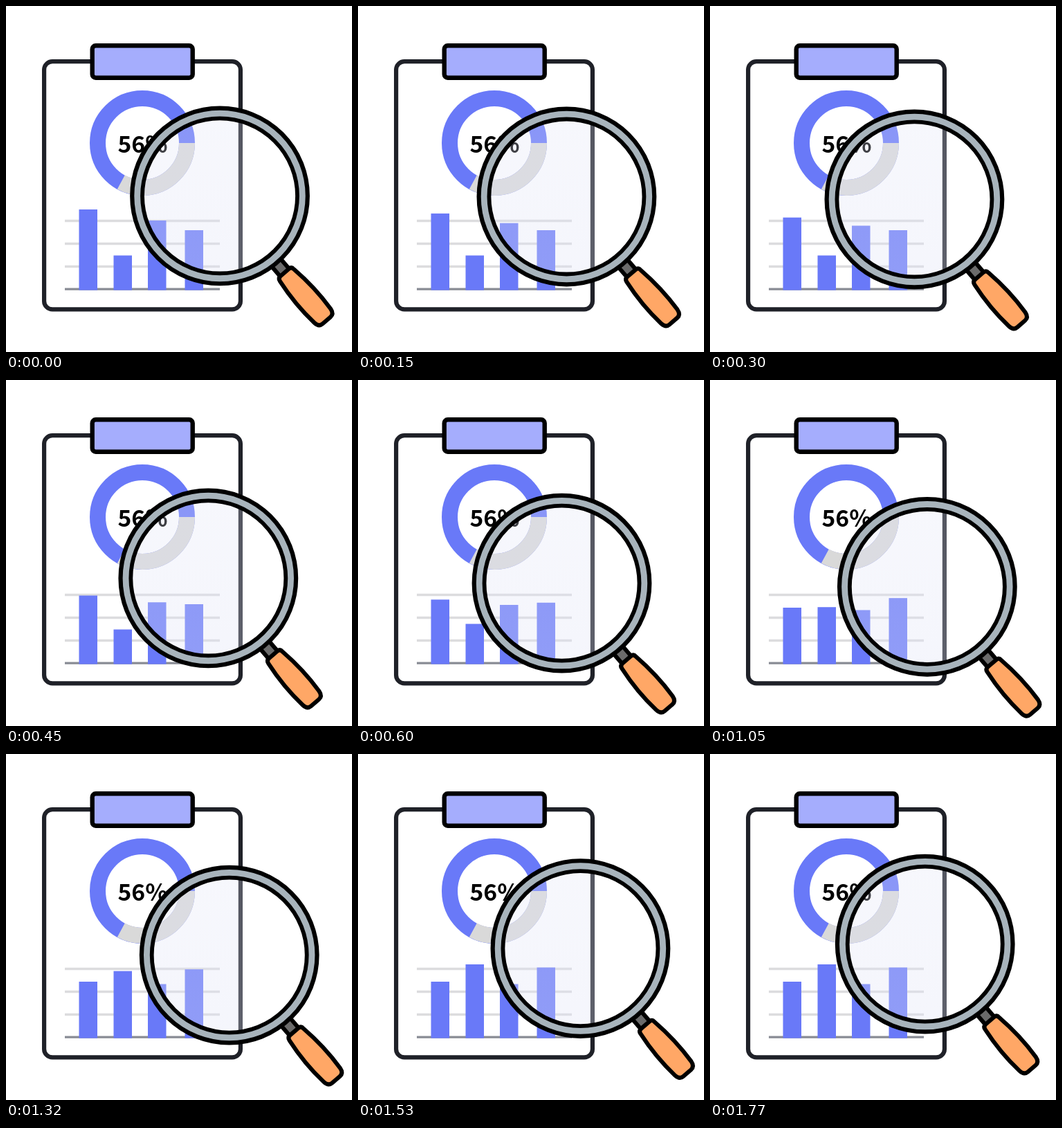
These frames come from a looping animation (500 by 500 pixels, 1.8 s). An HTML page:

```html
<!DOCTYPE html>
<html lang="en">
<head>
<meta charset="utf-8">
<title>Report review</title>
<style>
  html, body { margin: 0; width: 100%; height: 100%; overflow: hidden; background: #fff; }
  svg { display: block; width: 100%; height: 100%; }
  text { font: 700 33.6px "Noto Sans CJK SC", "Noto Sans CJK JP", "Noto Sans CJK", "Noto Sans", sans-serif; }
</style>
</head>
<body>
<svg viewBox="0 0 500 500">
  <defs>
    <clipPath id="sheet"><rect x="52" y="77" width="290" height="364" rx="15"/></clipPath>
    <linearGradient id="glass" x1="0" y1="0" x2="0" y2="1">
      <stop offset="0" stop-color="#e0e3f6" stop-opacity=".27"/>
      <stop offset="1" stop-color="#e0e3f6" stop-opacity=".33"/>
    </linearGradient>
  </defs>

  <rect x="55.1" y="80.1" width="283.8" height="358.3" rx="12" fill="#fff" stroke="#1f2128" stroke-width="6.2"/>
  <rect x="124.7" y="57.3" width="145" height="46.5" rx="5" fill="#a5adfd" stroke="#000" stroke-width="6.4"/>

  <g fill="none" stroke-width="23">
    <circle cx="197" cy="198" r="64.5" stroke="#6979f8"/>
    <circle cx="197" cy="198" r="64.5" stroke="#d9d9d9" pathLength="360" stroke-dasharray="118.5 241.5"/>
  </g>
  <text x="197.5" y="211.8" text-anchor="middle">56%</text>

  <path d="M85 310.5H309M85 343.5H309M85 376.5H309" stroke="#dcdcde" stroke-width="3.3"/>
  <path d="M85 409.2H309" stroke="#888b94" stroke-width="3.2"/>
  <g id="bars" fill="#6979f8"></g>

  <g clip-path="url(#sheet)"><circle class="lens" r="112" fill="url(#glass)"/></g>

  <g class="lens">
    <g transform="rotate(49.3)" stroke="#000" stroke-width="6" stroke-linejoin="round">
      <rect x="124" y="-7.3" width="26" height="17" fill="#6b6b6b"/>
      <path fill="#ffa766" d="M150 -12Q190 -18 228 -15Q237 -14 237 -7V8Q237 15 228 16Q190 20 150 14.5Q145 14 145 9V-7Q145 -12 150 -12Z"/>
    </g>
    <circle r="119.5" fill="none" stroke="#000" stroke-width="20.8"/>
    <circle r="119.3" fill="none" stroke="#a8b4bc" stroke-width="8.8"/>
  </g>
</svg>
<script>
  const LOOP = 1800, STEP = 30, BASE = 410.6;

  // x, first top, last top, start ms, end ms
  const BARS = [
    [105.5, 294, 329, 0, 900],
    [155.5, 360.5, 304, 450, 1500],
    [205, 310, 332.5, 0, 900],
    [258.5, 324, 308.5, 450, 1500]
  ];

  // time in ms, angle of the lens on its orbit
  const ORBIT = [[0, -4.5], [300, 53], [600, 121], [840, 164], [1050, 203], [1320, 254], [1800, 355.5]];

  const lerp = (a, b, k) => a + (b - a) * Math.min(1, Math.max(0, k));

  function angleAt(t) {
    const i = ORBIT.findIndex(p => p[0] > t);
    const [t0, a0] = ORBIT[i - 1], [t1, a1] = ORBIT[i];
    return lerp(a0, a1, (t - t0) / (t1 - t0)) * Math.PI / 180;
  }

  const group = document.getElementById("bars");
  const rects = BARS.map(([x]) => {
    const r = document.createElementNS("http://www.w3.org/2000/svg", "rect");
    r.setAttribute("x", x);
    r.setAttribute("width", 26.5);
    return group.appendChild(r);
  });
  const lens = document.querySelectorAll(".lens");

  function draw(t) {
    BARS.forEach(([, from, to, start, end], i) => {
      const top = lerp(from, to, (t - start) / (end - start));
      rects[i].setAttribute("y", top);
      rects[i].setAttribute("height", BASE - top);
    });
    const a = angleAt(t);
    const x = 307.8 - 15.5 * Math.sin(a);
    const y = 287.1 - 12.7 * Math.cos(a);
    lens.forEach(el => el.setAttribute("transform", `translate(${x} ${y})`));
  }

  function tick() {
    draw(Math.floor(performance.now() / STEP) * STEP % LOOP);
    requestAnimationFrame(tick);
  }
  tick();
</script>
</body>
</html>
```
